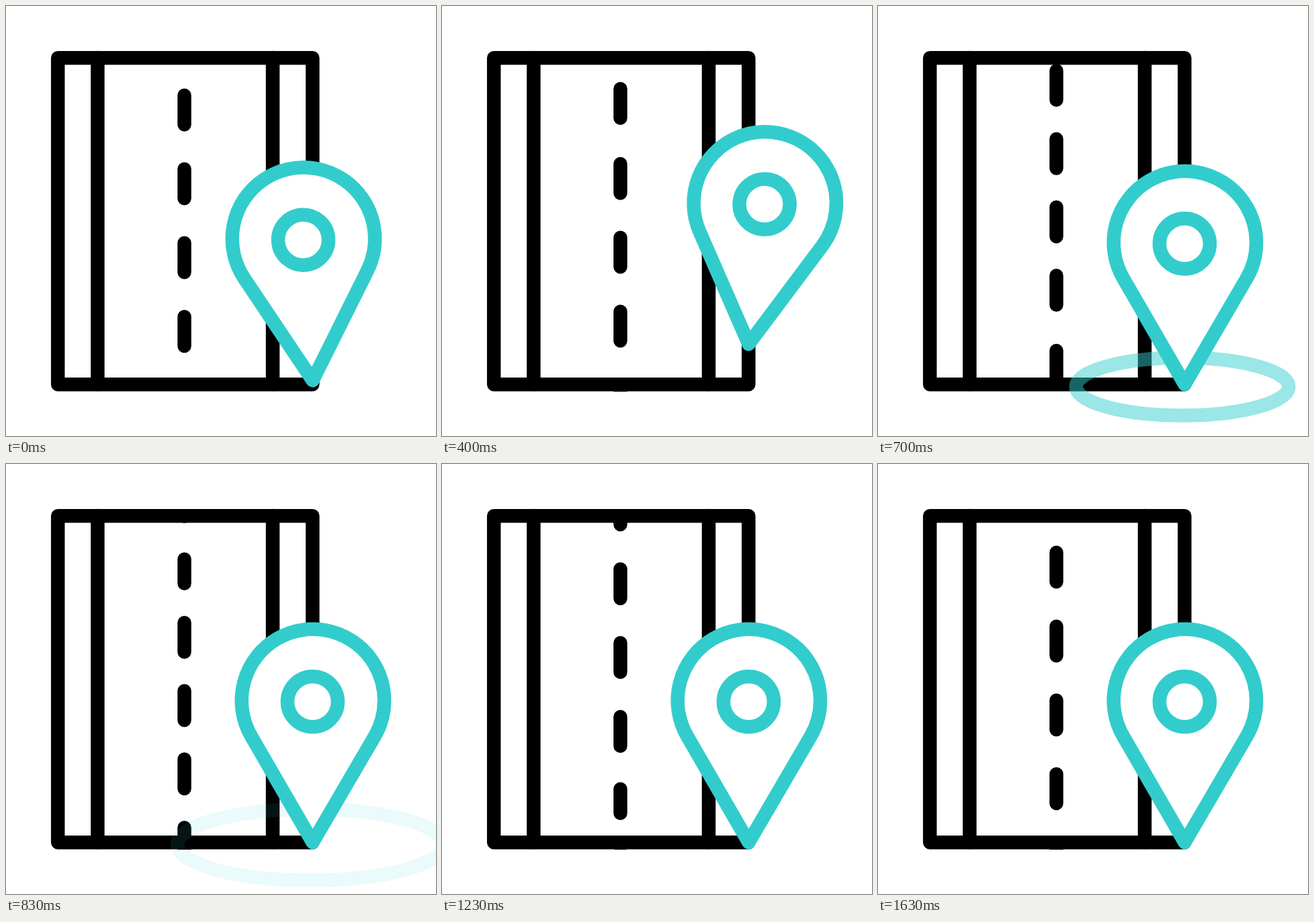
Animation, 640 px wide and 640 px high, one loop 1.67 s. Source, as an HTML page with a canvas:

```html
<!DOCTYPE html>
<html lang="en">
<head>
<meta charset="utf-8">
<title>Road and map pin</title>
<style>
  html, body { margin: 0; width: 100%; height: 100%; overflow: hidden; background: #fff; }
  canvas { display: block; width: 640px; height: 640px; }
</style>
</head>
<body>
<canvas id="stage" width="640" height="640"></canvas>
<script>
const ctx = document.getElementById('stage').getContext('2d');
const LOOP = 1670, STEP = 1000 / 30, LAST = 49;
const TEAL = '#33cccc', WIDTH = 20.5, CAP = WIDTH / 2;
const TIP = { x: 456.5, y: 563.2 };

// Smooth curve through [time, value] keys that never overshoots them.
function track(keys) {
  const slope = keys.slice(1).map((k, i) => (k[1] - keys[i][1]) / (k[0] - keys[i][0]));
  const tangent = keys.map((k, i) => {
    const a = slope[i - 1], b = slope[i];
    return a * b > 0 ? 2 * a * b / (a + b) : 0;
  });
  return t => {
    if (t <= keys[0][0]) return keys[0][1];
    const i = keys.findIndex(k => k[0] >= t) - 1;
    if (i < 0) return keys[keys.length - 1][1];
    const [t0, v0] = keys[i], [t1, v1] = keys[i + 1];
    const d = t1 - t0, u = (t - t0) / d, w = 1 - u;
    return v0 * w * w * (1 + 2 * u) + v1 * u * u * (3 - 2 * u)
      + d * u * w * (tangent[i] * w - tangent[i + 1] * u);
  };
}

// Times are in steps of 1/30 s.
const travel = track([[-1, -1.5], [0, 0], [6, 28], [12, 102], [17, 245], [25, 520],
  [31, 718], [37, 862], [43, 925], [49, 947.3]]);
const lift = track([[-1, 0], [0, 6], [3, 59], [6, 113], [7, 117], [8, 117],
  [12, 60], [14, 18], [16, 0]]);
const tilt = track([[-1, 0], [0, -3.8], [3.5, -27], [6, -15.6], [9.5, 12.9],
  [12, 6.5], [17, 0.7], [19, 0]]);

// The belt of lane marks as [top, bottom], at zero travel.
const marks = [];
function addMarks(top, gap, count) {
  for (let i = 0; i < count; i++) marks.push([top - i * gap, top - i * gap + 64]);
}
addMarks(452.2, 109.8, 4);
addMarks(11, 101.7, 4);
marks.push([-388.5, -332]);
addMarks(-496, 109.9, 5);

function line(x, y0, y1) {
  ctx.beginPath();
  ctx.moveTo(x, y0);
  ctx.lineTo(x, y1);
  ctx.stroke();
}

function drawRoad(shift) {
  ctx.strokeStyle = '#000';
  ctx.strokeRect(77.2, 77.2, 379.1, 486.1);
  line(136.4, 77, 563);
  line(397, 77, 563);

  ctx.save();
  ctx.beginPath();
  ctx.rect(250, 77, 31, 497);
  ctx.clip();
  for (const [top, bottom] of marks) line(265.5, top + shift + CAP, bottom + shift - CAP);
  ctx.restore();
}

function drawRipple(p) {
  if (p <= 0 || p >= 1) return;
  const grow = 1 - (1 - p) ** 2;
  ctx.save();
  ctx.globalAlpha = 1.08 * (1 - p) > 1 ? 1 : 1.08 * (1 - p);
  ctx.strokeStyle = TEAL;
  ctx.beginPath();
  ctx.ellipse(453, 566.5, 199.6 * grow, 2.5 + 51 * grow, 0, 0, 2 * Math.PI);
  ctx.stroke();
  ctx.restore();
}

function drawPin(height, degrees) {
  const r = 106.2, d = 211.2, a = Math.asin(r / d);
  ctx.save();
  ctx.translate(TIP.x, TIP.y - height);
  ctx.rotate(degrees * Math.PI / 180);
  ctx.strokeStyle = TEAL;
  ctx.fillStyle = '#fff';
  ctx.beginPath();
  ctx.moveTo(0, 0);
  ctx.arc(0.4, -d, r, Math.PI - a, a);
  ctx.closePath();
  ctx.fill();
  ctx.stroke();
  ctx.beginPath();
  ctx.arc(-0.1, -209.5, 37.5, 0, 2 * Math.PI);
  ctx.stroke();
  ctx.restore();
}

function draw(ms) {
  const step = Math.min(LAST, Math.floor((ms % LOOP + 5) / STEP));
  ctx.fillStyle = '#fff';
  ctx.fillRect(0, 0, 640, 640);
  ctx.lineWidth = WIDTH;
  ctx.lineCap = ctx.lineJoin = 'round';
  drawRoad(travel(step));
  drawRipple((step - 15) / 11);
  drawPin(lift(step), tilt(step));
}

const start = performance.now();
function tick() {
  draw(performance.now() - start);
  requestAnimationFrame(tick);
}
tick();
</script>
</body>
</html>
```
